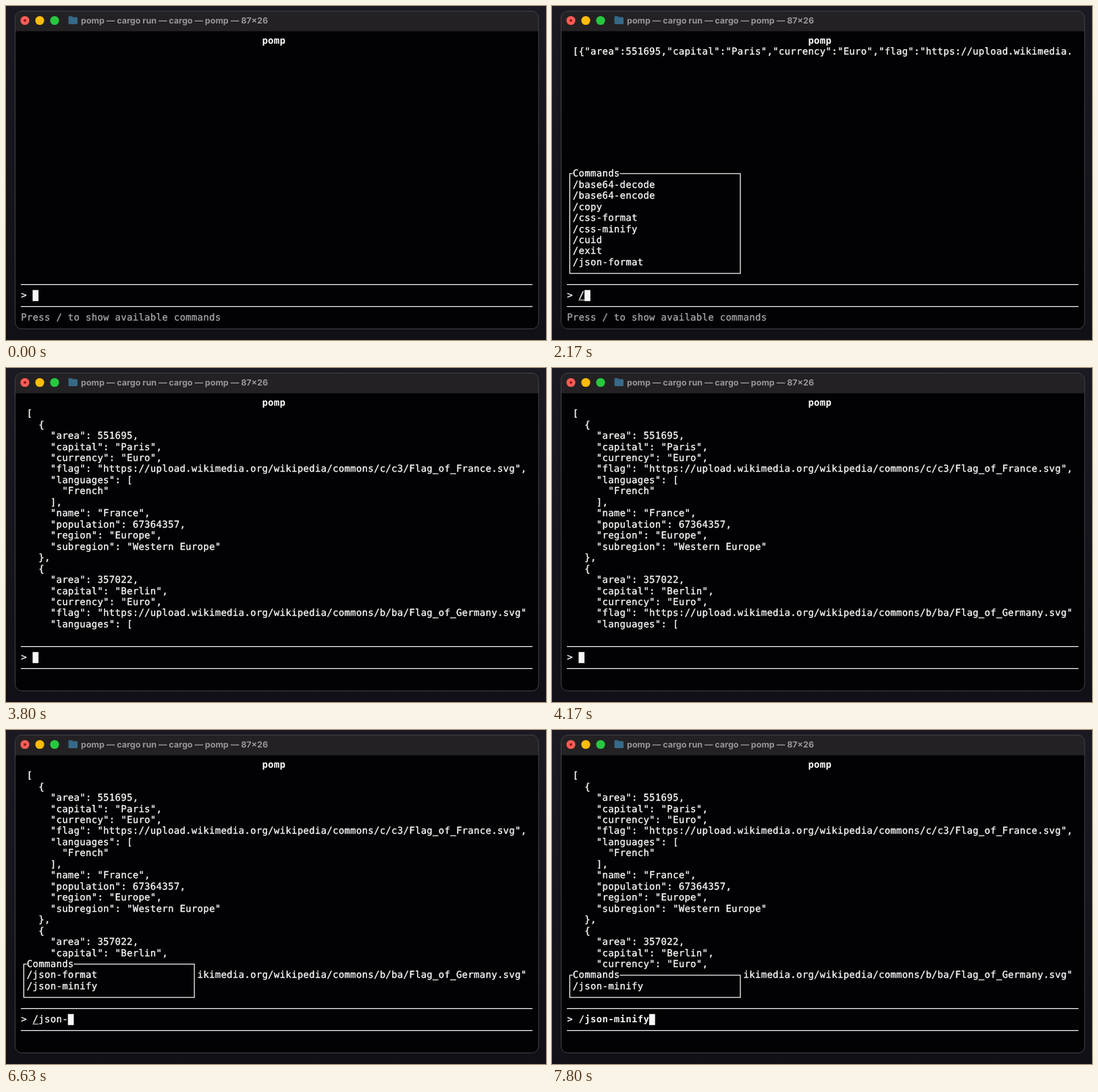
These frames come from a looping animation (800 by 496 pixels, 8000 ms). An HTML page with a canvas:

```html
<!DOCTYPE html>
<html lang="en">
<head>
<meta charset="utf-8">
<title>pomp terminal</title>
<style>
  html, body { margin: 0; width: 100%; height: 100%; overflow: hidden; background: #16141c; }
  canvas { display: block; }
</style>
</head>
<body>
<canvas id="stage" width="800" height="496"></canvas>
<script>
const ctx = document.getElementById('stage').getContext('2d');
ctx.textRendering = 'geometricPrecision';
const LOOP = 8000;

// Terminal grid
const LEFT = 22, TOP = 43.2, CELL = 8.713, ROW = 16.46, COLS = 87;
const TEXT = '#f8f7f8', BLACK = '#020103';
const colX = col => LEFT + col * CELL;
const rowY = row => TOP + row * ROW;

const FLAGS = 'https://upload.wikimedia.org/wikipedia/commons/';
const countries = [
  { area: 551695, capital: 'Paris', currency: 'Euro', flag: FLAGS + 'c/c3/Flag_of_France.svg',
    languages: ['French'], name: 'France', population: 67364357,
    region: 'Europe', subregion: 'Western Europe' },
  { area: 357022, capital: 'Berlin', currency: 'Euro', flag: FLAGS + 'b/ba/Flag_of_Germany.svg',
    languages: ['German'] }
];
const minified = JSON.stringify(countries);
const formatted = JSON.stringify(countries, null, 2).split('\n').slice(0, 20);

const commands = ['base64-decode', 'base64-encode', 'copy', 'css-format', 'css-minify',
  'cuid', 'exit', 'json-format', 'json-minify'].map(name => '/' + name);

// Tracks hold [start time, value]
const inputTrack = [
  [0, ''], [130, minified], [1000, ''],
  [1830, '/'], [2230, '/j'], [2320, '/js'], [2410, '/jso'], [2500, '/json'],
  [3400, '/json-format'], [3670, ''],
  [5900, '/'], [6100, '/j'], [6200, '/js'], [6300, '/jso'], [6400, '/json'],
  [6630, '/json-'], [7530, '/json-minify']
];
const outputTrack = [[0, []], [1000, [minified]], [3670, formatted]];
const selectTrack = [[0, -1], [2900, 0], [3400, -1], [6870, 0], [7170, 1], [7530, -1]];
const hintTrack = [[0, 'Press / to show available commands'], [3670, '']];
const valueAt = (track, t) => track.findLast(([start]) => start <= t)[1];

// A hairline stroke gives the regular face its medium weight
function print(text, col, row, color = TEXT, bold = false) {
  ctx.font = `${bold ? 'bold ' : ''}14px "DejaVu Sans Mono", monospace`;
  ctx.fillStyle = ctx.strokeStyle = color;
  ctx.lineWidth = 0.35;
  ctx.textAlign = 'center';
  [...text].forEach((char, i) => {
    const x = colX(col + i + 0.5), y = rowY(row) + 12.5;
    ctx.fillText(char, x, y);
    if (!bold) ctx.strokeText(char, x, y);
  });
}

function fillCells(col, row, cols, rows, color) {
  ctx.fillStyle = color;
  ctx.fillRect(colX(col), rowY(row), cols * CELL, rows * ROW);
}

function line(points, width = 1.3) {
  ctx.beginPath();
  points.forEach(([x, y]) => ctx.lineTo(x, y));
  ctx.strokeStyle = TEXT;
  ctx.lineWidth = width;
  ctx.stroke();
}

function disc(x, radius, color) {
  ctx.beginPath();
  ctx.arc(x, 21.5, radius, 0, 7);
  ctx.fillStyle = color;
  ctx.fill();
}

function drawWindow() {
  const backdrop = ctx.createLinearGradient(0, 0, 0, 496);
  backdrop.addColorStop(0, '#1b1922');
  backdrop.addColorStop(1, '#111016');
  ctx.fillStyle = backdrop;
  ctx.fillRect(0, 0, 800, 496);

  ctx.beginPath();
  ctx.roundRect(13.5, 7.5, 775.5, 472, 10);
  ctx.fillStyle = BLACK;
  ctx.fill();
  ctx.save();
  ctx.clip();
  ctx.fillStyle = '#232123';
  ctx.fillRect(13, 7, 777, 30.5);
  ctx.restore();
  ctx.strokeStyle = '#434245';
  ctx.lineWidth = 1;
  ctx.stroke();

  disc(28, 6.6, '#ff5c57');
  disc(28, 2, '#8a1a14');
  disc(50, 6.6, '#febc0a');
  disc(72, 6.6, '#27c840');

  ctx.fillStyle = '#2f5f80';
  ctx.fillRect(92.5, 15, 6, 4);
  ctx.fillStyle = '#376988';
  ctx.beginPath();
  ctx.roundRect(92.5, 16.5, 13.5, 10.5, 1.5);
  ctx.fill();

  ctx.font = 'bold 12.5px Inter, sans-serif';
  ctx.textAlign = 'left';
  ctx.fillStyle = '#989699';
  ctx.fillText('pomp — cargo run — cargo — pomp — 87×26', 111, 26.2);
}

function drawPopup(items, selected) {
  const top = 20 - items.length;
  fillCells(0, top, 30, items.length + 2, BLACK);
  const left = colX(0.5), right = colX(29.5), upper = rowY(top + 0.5), lower = rowY(21.5);
  line([[colX(1), upper], [left, upper], [left, lower], [right, lower], [right, upper], [colX(9), upper]]);
  print('Commands', 1, top);
  items.forEach((item, i) => {
    const active = i === selected;
    if (active) fillCells(1, top + 1 + i, 28, 1, '#e1dee1');
    print(item, 1, top + 1 + i, active ? BLACK : TEXT);
  });
}

function drawPrompt(input) {
  for (const row of [22.5, 24.5]) line([[colX(0), rowY(row)], [colX(COLS), rowY(row)]]);
  const complete = commands.includes(input);
  print('> ' + input.slice(0, COLS - 2), 0, 23, TEXT, complete);
  if (input[0] === '/' && !complete) {
    line([[colX(2), rowY(23) + 15], [colX(3), rowY(23) + 15]], 1);
  }
  if (input.length < COLS - 2) fillCells(2 + input.length, 23, 1, 1, TEXT);
}

function draw(t) {
  const input = valueAt(inputTrack, t);
  drawWindow();
  print('pomp', 41, 0, '#ffffff', true);
  valueAt(outputTrack, t).forEach((text, i) => print(text.slice(0, COLS - 2), 1, 1 + i));
  if (input[0] === '/') {
    const matches = commands.filter(name => name.startsWith(input)).slice(0, 8);
    drawPopup(matches, valueAt(selectTrack, t));
  }
  drawPrompt(input);
  print(valueAt(hintTrack, t), 0, 25, '#a5a3a6');
}

const begin = performance.now();
function tick() {
  draw((performance.now() - begin) % LOOP);
  requestAnimationFrame(tick);
}
tick();
</script>
</body>
</html>
```
